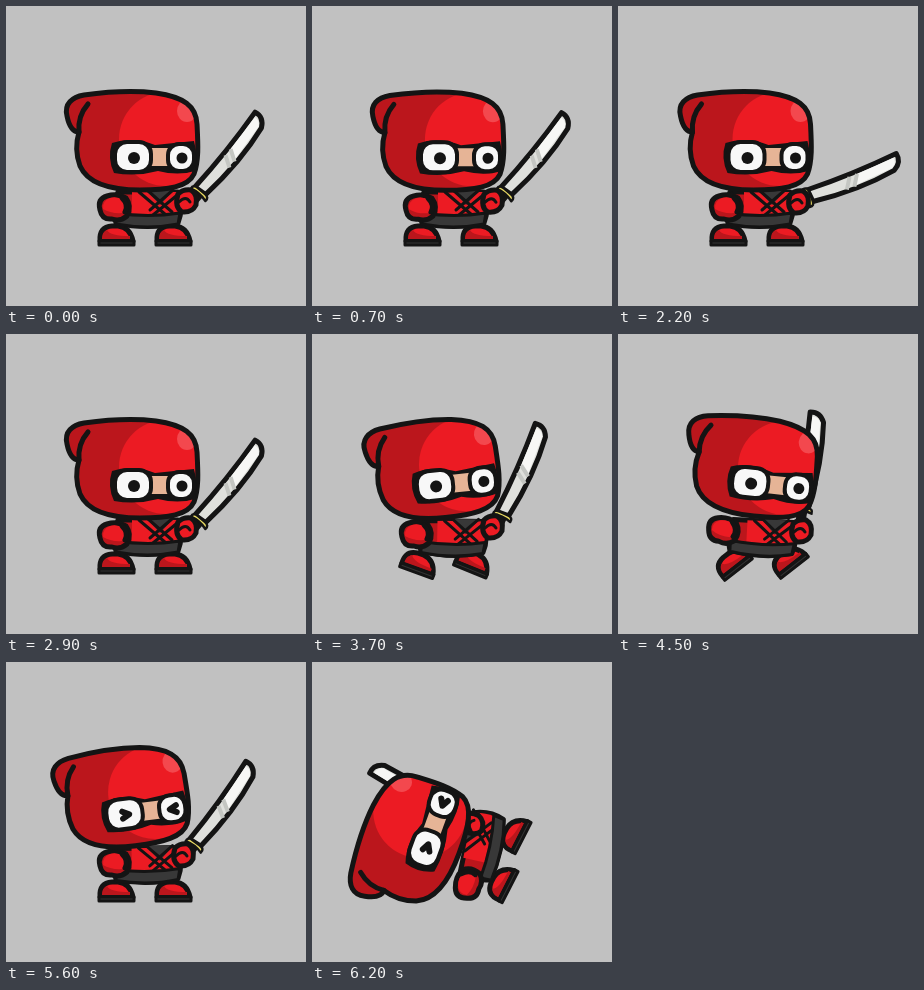
Recreate the animation shown at these times as an HTML page. Size 300 by 300 pixels, loop 6.4 s.

```html
<!DOCTYPE html>
<html lang="en">
<head>
<meta charset="utf-8">
<title>Red ninja</title>
<style>
  html, body { margin: 0; width: 100%; height: 100%; overflow: hidden; background: #c1c1c1; }
  svg { display: block; width: 100vw; height: 100vh; }
  .line { stroke: #141414; stroke-width: 5; stroke-linejoin: round; stroke-linecap: round; }
  .thin { stroke-width: 3; }
  .red { fill: #ec1b23; }
  .dark { fill: #bb161c; }
  .none { fill: none; }
</style>
</head>
<body>
<svg viewBox="0 0 300 300">
  <defs>
    <path id="skull" d="M73 126C70 136 70 149 74 160C82 178 104 184 134 184C162 184 182 181 188 168C193 154 192 138 191 118C190 100 178 91 150 87C125 84 100 86 78 89C66 91 58 98 61 110C63 120 67 126 73 126Z"/>
    <clipPath id="inHead"><use href="#skull"/></clipPath>
    <g id="foot">
      <path class="line red" d="M-16 6Q-17-8-4-9H2Q14-8 17 6Z"/>
      <path class="dark" d="M-14 3Q-14-3-9-5Q-6 1 14 1V4H-14Z"/>
      <path class="line thin" fill="#333" d="M-17 6H18V10H-17Z"/>
    </g>
  </defs>

  <g id="footR"><use href="#foot" x="167" y="229"/></g>
  <g id="footL"><use href="#foot" x="110" y="229"/></g>

  <g id="torso">
    <path class="line dark" d="M112 186H172Q178 202 172 217Q142 224 110 217Q105 200 112 186Z"/>
    <path class="red" d="M126 186H172Q175 198 173 208H126Z"/>
    <path fill="#383838" d="M140 184H168L154 199Z"/>
    <path class="none line thin" d="M133 186L160 209M141 184L166 206M175 186L147 209M167 184L144 204"/>
    <path class="line thin" fill="#383838" d="M110 207Q142 212 174 207L172 218Q142 224 110 218Z"/>
  </g>

  <g id="sword">
    <g transform="translate(193 187) rotate(-50)">
      <path class="line" fill="#333" d="M-13-2H0V3H-13Z"/>
      <path class="line" fill="#dfe0dc" d="M2-7Q50-5 98-9Q100 1 90 6Q50 12 3 6Z"/>
      <path fill="#f7f7f5" d="M54-4L94-6Q95 0 89 3L48 6Z"/>
      <path class="none" stroke="#c4c6c2" stroke-width="4" d="M46-4L39 7M54-4L47 7"/>
      <path class="line" style="stroke-width:2.500" fill="#eadb62" d="M-2-9Q3-10 3-4V5Q3 11-2 10Q1 0-2-9Z"/>
    </g>
  </g>

  <g id="armR">
    <path class="line red" d="M172 188Q168 201 176 206Q186 207 190 199Q192 188 185 184Q177 183 172 188Z"/>
    <path class="none line thin" d="M173 196Q180 189 184 196"/>
  </g>

  <g id="armL">
    <path class="line dark" d="M101 190Q91 193 94 204Q96 214 106 213Q114 216 121 210Q126 200 120 192Q111 187 101 190Z"/>
    <path class="red" d="M104 192Q96 195 97 203Q105 208 117 207Q122 201 117 194Q111 190 104 192Z"/>
    <path class="none line" d="M116 192Q123 199 119 206"/>
  </g>

  <g id="head">
    <use href="#skull" class="dark"/>
    <g clip-path="url(#inHead)">
      <ellipse class="red" cx="160" cy="133" rx="47" ry="47"/>
      <ellipse fill="#f3484e" cx="181" cy="105" rx="10" ry="11"/>
    </g>
    <use href="#skull" class="line none"/>
    <path class="line none" d="M82 98C75 106 72 115 73 126"/>
    <path fill="#141414" d="M106 137Q126 130 149 139Q168 137 188 135Q192 150 189 165Q172 170 152 165Q130 171 108 167Q101 152 106 137Z"/>
    <path fill="#e6b496" d="M143 142H163V160H143Z"/>
    <g class="line" style="stroke-width:4" fill="#f8f8f8">
      <rect x="109" y="136" width="36" height="30" rx="12"/>
      <rect x="162" y="138" width="26" height="27" rx="11"/>
    </g>
    <g id="pupils" fill="#141414"><circle cx="128" cy="152" r="6"/><circle cx="176" cy="152" r="5.500"/></g>
    <path id="squint" class="none line" style="stroke-width:6" d="M125 148.500l6.500 3.500-6.500 3.500M179 148.500l-6.500 3.500 6.500 3.500"/>
  </g>
</svg>
<script>
const LOOP = 6400, STEP = 100;
const $ = id => document.getElementById(id);

const pivots = {
  head: [151, 152], torso: [142, 214], armL: [109, 201], armR: [180, 195],
  footL: [110, 229], footR: [167, 229], sword: [193, 187]
};

// Each pose gives [dx, dy, degrees] per part; missing parts rest.
const idle = {};
const run = { head: [5, 1, 6], torso: [1, 1, 6], armL: [16, -2, -10], armR: [-10, 8, 0], sword: [-16, 16, 42] };
const windUp = { head: [-4, -1, -4], torso: [-1, 0, -2], armR: [-3, -1, 0], sword: [-8, -3, -8] };
const thrust = { head: [5, 0, 4], torso: [2, 0, 3], armR: [3, 4, 0], sword: [2, 6, 38] };
const recover = { head: [1.5, 0, 0], armR: [0, 1, 0], sword: [-3, 4, 29] };
const raise = { head: [-4, -1, -4], torso: [-1, 0, -2], armR: [0, -10, -20], sword: [-3, -35, -32] };
const rise = { head: [-4, -2, -6], torso: [-1, 1, 1], armL: [-4, -1, 0], armR: [0, -2, 0],
  footL: [-3, 0, 20], footR: [-6, -1, 22], sword: [-3, -5, -15] };
const fall = { head: [5, 0, 6], torso: [2, 1, 3], armL: [-3, -5, 10], armR: [3, 2, 0],
  footL: [4, -1, -38], footR: [3, -3, -38], sword: [-9, -11, -30] };
const hurt = { head: [-8.5, -2, -7], torso: [0, 0, -1], armR: [-3, -2, 0], sword: [-5, -4, -3] };
const fling = { head: [-12, -4, -32], torso: [16, -14, -32], armL: [20, 4, -30], armR: [-10, -24, -30],
  footL: [30, -6, -28], footR: [14, -24, -28], sword: [-28, -58, -55] };
const dead = { head: [-28, 12, -70], torso: [40, -28, -78], armL: [47, 20, -75], armR: [-20, -33, -75],
  footL: [79, -8, -63], footR: [35, -57, -63], sword: [-50, -27, -95] };
const crash = { ...dead, head: [-30, 12, -76], sword: [-56, -30, -102] };

const keys = [
  [0, idle], [700, idle], [800, run], [1500, run], [1600, idle], [1800, windUp],
  [2000, thrust], [2100, thrust], [2200, recover], [2300, idle], [2500, raise],
  [2600, thrust], [2700, recover], [2900, idle], [3100, idle], [3300, rise],
  [4100, rise], [4300, fall], [4800, fall], [4900, idle], [5100, hurt],
  [5400, idle], [5500, idle], [5600, hurt], [5900, fling], [6100, crash], [6200, dead], [LOOP, dead]
];

function poseAt(t) {
  const i = keys.findIndex(k => k[0] > t);
  const [t0, from] = keys[i - 1], [t1, to] = keys[i];
  const u = (t - t0) / (t1 - t0), rest = [0, 0, 0], pose = {};
  for (const part in pivots) {
    const a = from[part] || rest, b = to[part] || rest;
    pose[part] = a.map((v, n) => v + (b[n] - v) * u);
  }
  return pose;
}

function shift(pose, part, ...by) {
  by.forEach((v, n) => pose[part][n] += v);
}

function addCycles(pose, t) {
  const wave = Math.sin(2 * Math.PI * (t - 500) / 800);
  if (t < 800) {
    const breath = (1 - Math.cos(2 * Math.PI * t / 800)) / 2;
    shift(pose, 'head', 0, 2 * breath, -breath);
    shift(pose, 'armL', 0, breath, 0);
    shift(pose, 'armR', 0, breath, 0);
    shift(pose, 'sword', 0, 1.5 * breath, 2 * breath);
  } else if (t < 1600) {
    const p = 2 * Math.PI * (t - 1300) / 800 + 1.9;
    const c = Math.cos(p), s = Math.sin(p);
    pose.footL = [28 + 30 * c, -1 - 10 * Math.max(0, -s), 8 + 20 * Math.max(0, -s)];
    pose.footR = [-25 - 30 * c, -5 * Math.max(0, s), 5 * s];
    shift(pose, 'head', 0, 1.5 * wave, wave);
    shift(pose, 'sword', 0, wave, 2 * wave);
  } else if (t >= 3300 && t < 4800) {
    shift(pose, 'head', 0, wave, wave);
    shift(pose, 'sword', 0, wave, 1.5 * wave);
  }
}

function draw(now) {
  const t = Math.floor(now % LOOP / STEP) * STEP;
  const pose = poseAt(t);
  addCycles(pose, t);
  for (const part in pivots) {
    const [x, y] = pivots[part], [dx, dy, angle] = pose[part];
    $(part).setAttribute('transform', `translate(${x + dx} ${y + dy}) rotate(${angle}) translate(${-x} ${-y})`);
  }
  const squinting = t >= 5600 || t >= 4900 && t < 5400;
  $('pupils').style.display = squinting ? 'none' : '';
  $('squint').style.display = squinting ? '' : 'none';
}

const start = performance.now();
function tick() {
  draw(performance.now() - start);
  requestAnimationFrame(tick);
}
tick();
</script>
</body>
</html>
```
